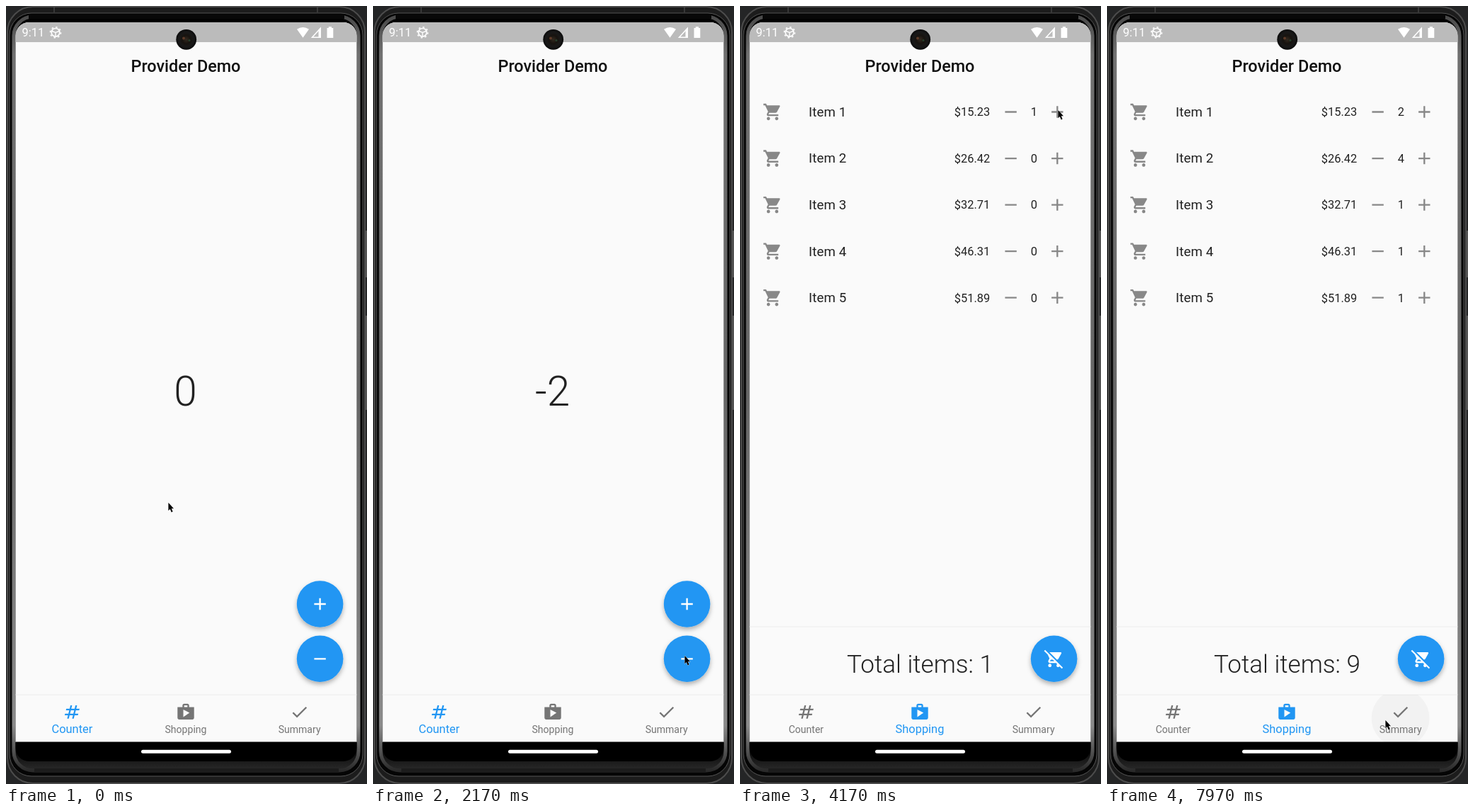
An HTML page for the animation above (8000 ms loop, 510 by 1098 pixels).

```html
<!DOCTYPE html>
<html lang="en">
<head>
<meta charset="utf-8">
<title>Provider Demo</title>
<style>
  html, body { margin: 0; width: 100%; height: 100%; overflow: hidden; background: #242526; }
  svg { display: block; width: 510px; height: 1098px; font-family: Roboto, sans-serif; }
  .mid { text-anchor: middle; }
  .title { font-size: 23.4px; font-weight: 500; fill: #111; }
  .count { font-size: 58.5px; font-weight: 300; fill: #212121; }
  .total { font-size: 35.1px; font-weight: 300; fill: #212121; }
  .item { font-size: 18.7px; fill: #212121; letter-spacing: .1px; }
  .small { font-size: 16.4px; fill: #212121; }
  .clock { font-size: 16.4px; fill: #fff; }
</style>
</head>
<body>
<svg viewBox="0 0 510 1098">
  <defs>
    <linearGradient id="rail" x2="0" y2="1">
      <stop offset="0" stop-color="#4a4a4a"/><stop offset=".05" stop-color="#707070"/>
      <stop offset=".5" stop-color="#666"/><stop offset=".94" stop-color="#8a8a8a"/>
      <stop offset="1" stop-color="#2a2a2a"/>
    </linearGradient>
    <linearGradient id="chin" x2="0" y2="1">
      <stop offset="0" stop-color="#000"/><stop offset=".97" stop-color="#050505"/>
      <stop offset="1" stop-color="#2a2a2a"/>
    </linearGradient>
    <radialGradient id="lens">
      <stop offset="0" stop-color="#33291f"/><stop offset=".4" stop-color="#17130f"/>
      <stop offset=".7" stop-color="#191919"/><stop offset="1" stop-color="#0b0b0b"/>
    </radialGradient>
    <filter id="shadow" x="-30%" y="-30%" width="160%" height="170%">
      <feDropShadow dx="0" dy="3.5" stdDeviation="3.4" flood-opacity=".3"/>
    </filter>
    <clipPath id="screen"><rect x="13.5" y="23" width="482" height="1043" rx="19"/></clipPath>
    <clipPath id="bar"><rect x="13.5" y="972" width="482" height="66.5"/></clipPath>

    <path id="hash" d="M20.5 10 21 8h-4l1-4h-2l-1 4h-4l1-4h-2L9 8H5l-.5 2h4l-1 4h-4L3 16h4l-1 4h2l1-4h4l-1 4h2l1-4h4l.5-2h-4l1-4zM13.5 14h-4l1-4h4z"/>
    <path id="shop" d="M16 6V4c0-1.11-.89-2-2-2h-4c-1.11 0-2 .89-2 2v2H2v13c0 1.11.89 2 2 2h16c1.11 0 2-.89 2-2V6zM10 4h4v2h-4zM9 18V9l7.5 4z"/>
    <path id="check" d="M9 16.17 4.83 12l-1.42 1.41L9 19 21 7l-1.41-1.41z"/>
    <path id="plus" d="M19 13h-6v6h-2v-6H5v-2h6V5h2v6h6z"/>
    <path id="minus" d="M19 13H5v-2h14z"/>
    <path id="cart" d="M7 18c-1.1 0-1.99.9-1.99 2S5.9 22 7 22s2-.9 2-2-.9-2-2-2zM1 2v2h2l3.6 7.59-1.35 2.45c-.16.28-.25.61-.25.96 0 1.1.9 2 2 2h12v-2H7.42c-.14 0-.25-.11-.25-.25l.03-.12.9-1.63h7.45c.75 0 1.41-.41 1.75-1.03l3.58-6.49c.08-.14.12-.31.12-.48 0-.55-.45-1-1-1H5.21l-.94-2zM17 18c-1.1 0-1.99.9-1.99 2s.89 2 1.99 2 2-.9 2-2-.9-2-2-2z"/>
    <path id="nocart" d="M22.73 22.73 1.27 1.27 0 2.54l4.39 4.39 2.21 4.66-1.35 2.45c-.16.28-.25.61-.25.96 0 1.1.9 2 2 2h7.46l1.38 1.38c-.5.36-.83.95-.83 1.62 0 1.1.89 2 1.99 2 .67 0 1.26-.33 1.62-.84L21.46 24zM7.42 15c-.14 0-.25-.11-.25-.25l.03-.12.9-1.63h2.36l2 2zM15.55 13c.75 0 1.41-.41 1.75-1.03l3.58-6.49c.08-.14.12-.31.12-.48 0-.55-.45-1-1-1H6.54zM7 18c-1.1 0-1.99.9-1.99 2S5.9 22 7 22s2-.9 2-2-.9-2-2-2z"/>
  </defs>

  <!-- phone body -->
  <rect width="510" height="1098" fill="#242526"/>
  <path d="M508.5 317V383M508.5 437V570" stroke="#555" stroke-width="3"/>
  <rect x="2" y="1" width="505" height="1096" rx="36" fill="#1c1c1c" stroke="#4c4c4c" stroke-width="2"/>
  <rect x="5" y="10" width="499" height="1077" rx="31" fill="#050505" stroke="#555"/>
  <rect x="11" y="15" width="487" height="1064" rx="27" fill="url(#chin)" stroke="url(#rail)" stroke-width="5"/>
  <path d="M32 15H478" stroke="#080808" stroke-width="7"/>
  <path d="M40 1079H470" stroke="#1c1c1c" stroke-width="6"/>
  <path d="M68 1v8M440 1v8" stroke="#555"/>

  <g clip-path="url(#screen)">
    <rect x="13" y="23" width="483" height="1016" fill="#fafafa"/>
    <rect x="13" y="23" width="483" height="28" fill="#bbb"/>
    <rect x="13" y="1038.5" width="483" height="30"/>
    <rect x="191" y="1049.8" width="127" height="5" rx="2.5" fill="#fff"/>
    <text class="clock" x="22.5" y="43.3">9:11</text>
    <g fill="none" stroke="#fff">
      <circle cx="70" cy="37.3" r="5.8" stroke-width="1.7"/>
      <circle cx="70" cy="37.3" r="7.5" stroke-width="1.6" stroke-dasharray="2.4 3.49"/>
      <path d="M70 37.3V42M70 37.3 65 35.5M70 37.3 75 35.5" stroke-width="1.4"/>
      <path d="M432.5 44.2H444.2V31.5z" stroke-width="1.5"/>
    </g>
    <path d="M411 32.8Q419.5 27 428 32.8L419.5 44.8zM441.5 34 444.5 31V45H441.5zM453.5 31h2.3v-1.8h4.2V31h2.3V45h-8.8z" fill="#fff"/>
    <text class="title mid" x="254" y="92.6">Provider Demo</text>
    <g id="counterPage"></g>
    <g id="shopPage"></g>
    <path d="M13 972H496" stroke="#ececec"/>
    <g id="nav"></g>
  </g>
  <circle cx="254.7" cy="47.3" r="14.4" fill="url(#lens)"/>
  <circle cx="251" cy="45.5" r="2" fill="#5c3a28"/>
  <circle cx="259" cy="48.5" r="1.5" fill="#26402c"/>
  <path id="cursor" d="M.4 0V11.2L2.8 9 4.7 13.4 6.6 12.5 4.8 8.3H8z" stroke="#fff" stroke-width=".7" paint-order="stroke"/>
</svg>

<script>
const LOOP = 8000, PAGE_SWITCH = 3260, UNIT = 1.1705;
const BLUE = [33, 150, 243], GREY = [117, 117, 117];
const $ = id => document.getElementById(id);

// time, x, y of the pointer tip
const pointer = [
  [170, 229, 701], [730, 435, 853], [1030, 435, 853], [1130, 435, 883], [1330, 440, 918],
  [2170, 440, 917], [2600, 440, 917], [2870, 254, 997], [3040, 254, 997], [3230, 350, 359],
  [3830, 445, 155], [4000, 449, 147], [4400, 449, 147], [4770, 453, 340], [4985, 453, 340],
  [5030, 450, 401], [5310, 450, 401], [5470, 441, 276], [5570, 442, 274], [5810, 442, 274],
  [6030, 445, 219], [6200, 445, 219], [6230, 448, 216], [6790, 448, 216], [7270, 390, 1000],
  [7470, 390, 1000], [7600, 393, 1008]
];
const passing = new Set([1130, 3230, 5470]);
const plusTaps = [1000, 1050];
const minusTaps = [1570, 1770, 1970, 2170, 2400, 2570];
const itemTaps = [[4170, 4370], [6230, 6430, 6600, 6770], [5800], [4900], [5300]];
const navTaps = [[], [3030], [7870]];
const prices = ["15.23", "26.42", "32.71", "46.31", "51.89"];

function add(parent, tag, attrs, text) {
  const el = document.createElementNS("http://www.w3.org/2000/svg", tag);
  for (const key in attrs) el.setAttribute(key, attrs[key]);
  if (text !== undefined) el.textContent = text;
  return parent.appendChild(el);
}
const icon = (parent, name, x, y, fill) => add(parent, "use", {
  href: "#" + name, fill, transform: `translate(${x} ${y}) scale(${UNIT}) translate(-12 -12)`
});
const ripple = (parent, x, y) => add(parent, "circle", { cx: x, cy: y, r: 0, fill: "#000" });

function fab(parent, name, y) {
  add(parent, "circle", { cx: 443.6, cy: y, r: 32.8, fill: "#2196f3", filter: "url(#shadow)" });
  const splash = add(parent, "circle", { cx: 443.6, cy: y, r: 32.8, fill: "#c8c8c8", opacity: 0 });
  icon(parent, name, 443.6, y, "#fff");
  return splash;
}

const counterPage = $("counterPage"), shopPage = $("shopPage"), nav = $("nav");
const countText = add(counterPage, "text", { class: "count mid", x: 253.6, y: 563.8 });
const plusSplash = fab(counterPage, "plus", 844);
const minusSplash = fab(counterPage, "minus", 921.3);

const rows = prices.map((price, i) => {
  const y = 149.5 + i * 65.55;
  const halo = ripple(shopPage, 448.3, y);
  icon(shopPage, "cart", 46, y, "#888");
  add(shopPage, "text", { class: "item", x: 97, y: y + 6.4 }, "Item " + (i + 1));
  add(shopPage, "text", { class: "small", x: 302.8, y: y + 5.8 }, "$" + price);
  icon(shopPage, "minus", 382.6, y, "#888");
  icon(shopPage, "plus", 448.3, y, "#888");
  return { halo, amount: add(shopPage, "text", { class: "small mid", x: 415.4, y: y + 5.8 }) };
});
add(shopPage, "path", { d: "M13 876H496", stroke: "#ececec" });
const totalText = add(shopPage, "text", { class: "total mid", x: 254.5, y: 941.3 });
fab(shopPage, "nocart", 921.3);

nav.setAttribute("clip-path", "url(#bar)");
const tabs = [["hash", "Counter"], ["shop", "Shopping"], ["check", "Summary"]].map(([name, label], i) => {
  const x = 93.4 + i * 160.6;
  return {
    halo: ripple(nav, x, 1005),
    icon: icon(nav, name, x, 996.4),
    label: add(nav, "text", { class: "mid", x, y: 1025.7 }, label)
  };
});

const clamp = v => Math.min(1, Math.max(0, v));
const smooth = v => v * v * (3 - 2 * v);
const done = (taps, t) => taps.filter(tap => tap <= t).length;
const sinceTap = (taps, t) => t - Math.max(-1e6, ...taps.filter(tap => tap <= t));

// quick rise, hold, then fade
const pulse = (age, hold, fade) => Math.min(clamp(age / 30), clamp((hold + fade - age) / fade));

function showRipple(circle, taps, t, strength) {
  const age = sinceTap(taps, t);
  circle.setAttribute("r", 41 * Math.sqrt(clamp(age / 90)));
  circle.setAttribute("opacity", strength * pulse(age, 200, 150));
}

function showTab(tab, active) {
  const mix = GREY.map((c, i) => Math.round(c + (BLUE[i] - c) * active));
  const fill = `rgb(${mix})`;
  tab.icon.setAttribute("fill", fill);
  tab.label.setAttribute("fill", fill);
  tab.label.setAttribute("font-size", 14.05 + 2.35 * active);
}

function pointerAt(t) {
  const next = pointer.findIndex(key => key[0] > t);
  if (next < 0) return pointer.at(-1).slice(1);
  if (next === 0) return pointer[0].slice(1);
  const [t0, x0, y0] = pointer[next - 1], [t1, x1, y1] = pointer[next];
  let p = (t - t0) / (t1 - t0);
  if (passing.has(t0)) p = 1 - (1 - p) ** 2;
  else if (passing.has(t1)) p = p ** 1.5;
  else p = smooth(p);
  return [x0 + (x1 - x0) * p, y0 + (y1 - y0) * p];
}

function draw(t) {
  const shopping = t >= PAGE_SWITCH;
  counterPage.style.display = shopping ? "none" : "";
  shopPage.style.display = shopping ? "" : "none";

  countText.textContent = done(plusTaps, t) - done(minusTaps, t);
  plusSplash.setAttribute("opacity", .425 * pulse(sinceTap(plusTaps, t), 110, 120));
  minusSplash.setAttribute("opacity", .425 * pulse(sinceTap(minusTaps, t), 90, 100));

  let total = 0;
  rows.forEach((row, i) => {
    const amount = done(itemTaps[i], t);
    total += amount;
    row.amount.textContent = amount;
    showRipple(row.halo, itemTaps[i], t, .04);
  });
  totalText.textContent = "Total items: " + total;

  const change = smooth(clamp((t - PAGE_SWITCH) / 200));
  [1 - change, change, 0].forEach((active, i) => {
    showTab(tabs[i], active);
    showRipple(tabs[i].halo, navTaps[i], t, .032);
  });

  $("cursor").setAttribute("transform", `translate(${pointerAt(t)})`);
}

function tick() {
  draw(performance.now() % LOOP);
  requestAnimationFrame(tick);
}
tick();
</script>
</body>
</html>
```
